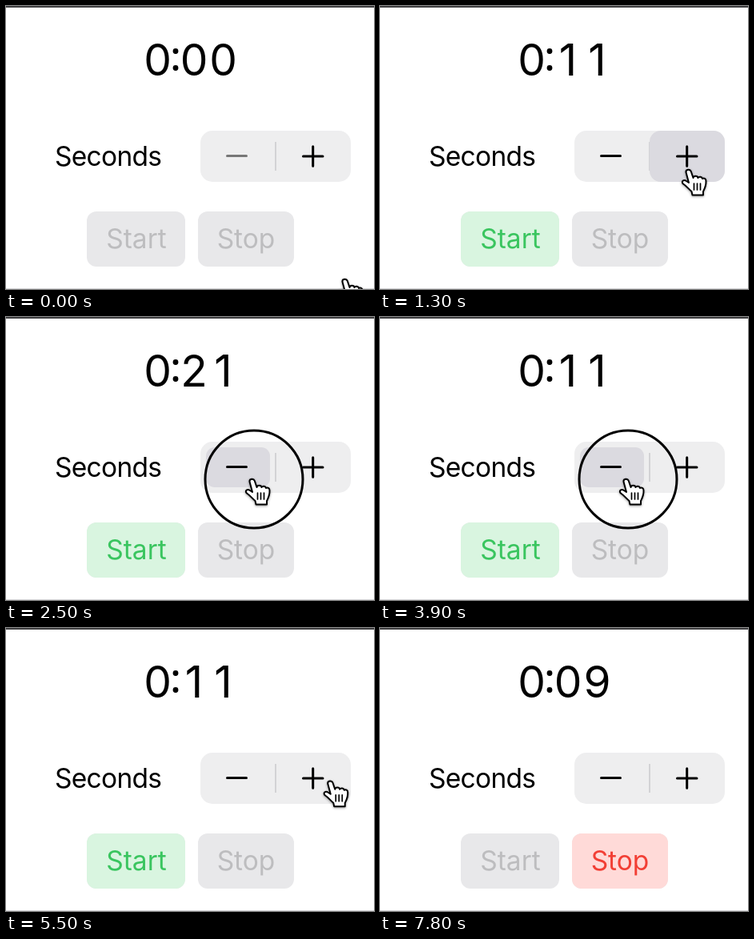
Animation, 460 px wide and 354 px high, one loop 8000 ms. Source, as an HTML page:

```html
<!DOCTYPE html>
<html lang="en">
<head>
<meta charset="utf-8">
<title>Timer</title>
<style>
  html, body { margin: 0; width: 100%; height: 100%; overflow: hidden; background: #fff; }
  svg { display: block; width: 460px; height: 354px; }
  text { font-family: Inter, Roboto, sans-serif; font-size: 33.5px; }
  .digit { font-size: 55px; text-anchor: middle; }
  .label { letter-spacing: -.7px; }
  .button text { text-anchor: middle; }
  .off rect { fill: #e8e8ea; }
  .off text { fill: #bdbdbf; }
  #startOn rect { fill: #d9f5e0; }
  #startOn text { fill: #3ac55f; }
  #stopOn rect { fill: #ffdad8; }
  #stopOn text { fill: #f23f35; }
  .sign { fill: none; stroke: #000; stroke-width: 3; stroke-linecap: round; }
  #hand { filter: drop-shadow(0 1.5px 1.5px rgba(0, 0, 0, .4)); }
</style>
</head>
<body>
<svg viewBox="0 0 460 354">
  <rect width="460" height="2" fill="#3f3f41"/>
  <rect y="353" width="460" height="1" fill="#d8d8da"/>

  <text class="digit" x="189.5" y="87">0</text>
  <circle cx="212" cy="56.5" r="3.4"/>
  <circle cx="212" cy="77.5" r="3.4"/>
  <text class="digit" id="tens" x="235" y="87">0</text>
  <text class="digit" id="ones" x="271.5" y="87">0</text>

  <text class="label" x="61" y="200">Seconds</text>

  <rect x="243" y="156" width="188" height="64" rx="15" fill="#eeeeef"/>
  <rect x="336" y="170" width="2" height="36" fill="#d3d3d5"/>
  <rect id="press" fill="#dbdae0"/>
  <path class="sign" id="minus" d="M276.500 187.500H300.500"/>
  <path class="sign" d="M371.500 188H396M383.700 175.700V200.300"/>

  <g class="button">
    <g class="off">
      <rect x="101" y="257" width="123" height="69" rx="12"/>
      <text x="163" y="303">Start</text>
      <rect x="240" y="257" width="120" height="69" rx="12"/>
      <text x="300" y="303">Stop</text>
    </g>
    <g id="startOn">
      <rect x="101" y="257" width="123" height="69" rx="12"/>
      <text x="163" y="303">Start</text>
    </g>
    <g id="stopOn">
      <rect x="240" y="257" width="120" height="69" rx="12"/>
      <text x="300" y="303">Stop</text>
    </g>
  </g>

  <circle id="ring" r="61" fill="none" stroke="#000" stroke-width="3"/>
  <g id="hand" stroke="#000" stroke-width="2" stroke-linejoin="round" stroke-linecap="round">
    <path fill="#fff" d="M-3.500 3C-4-1 1.500-1.500 2.800 2L5.500 10C6 7 11 7 11.500 10C13 8 16.500 8.500 17 11C19 9.800 21.500 11 21.500 14C21.800 20 20.500 22 18 27V31.500H4.500L3.500 27C0 24-3 20-7 17.500C-10 14.500-6.500 11.500-3 14L0 16Z"/>
    <path d="M6.500 17V25M10.500 17V25M14.500 17V25" stroke-width="1.700"/>
  </g>
</svg>
<script>
  const LOOP = 8000, STEP = 100;
  const $ = id => document.getElementById(id);
  const clamp = v => Math.min(1, Math.max(0, v));
  const set = (el, attrs) => {
    for (const name in attrs) el.setAttribute(name, attrs[name]);
  };

  // Pointer path: time, x, y
  const path = [
    [0, 424, 342], [300, 424, 342], [1000, 386, 205], [2100, 386, 205],
    [2500, 308, 203], [4400, 308, 203], [4500, 313, 205], [4700, 414, 188],
    [5400, 414, 188], [6300, 173, 298], [7400, 173, 298], [7500, 146, 331],
    [7600, 140, 400], [8000, 140, 400]
  ];
  // Stepper clicks: time, left edge of the pressed half, new value
  const clicks = [
    [1050, 337, 11], [1650, 337, 21], [2500, 243, 11], [3850, 243, 0], [4650, 337, 11]
  ];
  const ticks = [[6800, 10], [7800, 9]];
  const values = [...clicks.map(([t, , v]) => [t + 100, v]), ...ticks];

  function pointer(t) {
    const i = path.findIndex(p => p[0] > t);
    const [t0, x0, y0] = path[i - 1], [t1, x1, y1] = path[i];
    const u = (t - t0) / (t1 - t0), k = u * u * (3 - 2 * u);
    return [x0 + (x1 - x0) * k, y0 + (y1 - y0) * k];
  }

  function draw(t) {
    const [x, y] = pointer(t);
    $("hand").setAttribute("transform", `translate(${x} ${y})`);

    let count = 0;
    for (const [at, v] of values) if (t >= at) count = v;
    $("tens").textContent = Math.floor(count / 10);
    $("ones").textContent = count % 10;
    $("minus").style.stroke = count ? "#000" : "#777";

    const click = clicks.find(c => t >= c[0] && t < c[0] + 450);
    const age = click ? t - click[0] : LOOP;
    set($("ring"), { cx: x + 2, cy: y, opacity: age < 250 ? 1 : 0 });
    const inset = age < 100 ? 7 : 0;
    set($("press"), {
      x: (click ? click[1] : 243) + inset, y: 156 + inset,
      width: 94 - 2 * inset, height: 64 - 2 * inset,
      rx: inset ? 11 : 14, opacity: clamp((450 - age) / 200)
    });

    const run = clamp((t - 6600) / 400);
    set($("startOn"), { opacity: count ? 1 - run : 0 });
    set($("stopOn"), { opacity: run });
  }

  const begin = performance.now();
  function frame() {
    const t = (performance.now() - begin) % LOOP;
    draw(Math.floor(t / STEP) * STEP);
    requestAnimationFrame(frame);
  }
  draw(0);
  requestAnimationFrame(frame);
</script>
</body>
</html>
```
